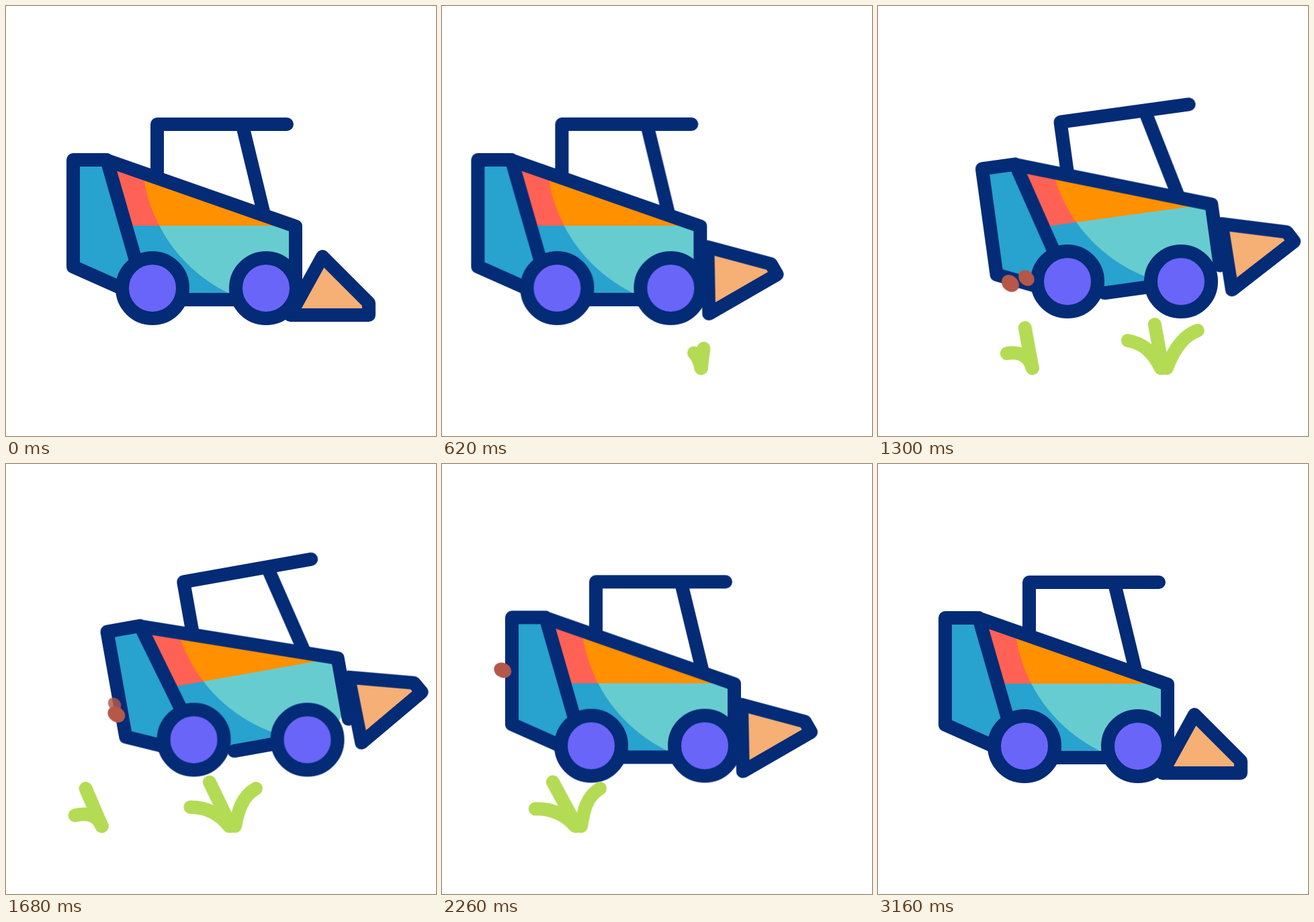
Recreate the animation shown at these times as an HTML page without scripts. Size 640 by 640 pixels, loop 3600 ms.

```html
<!DOCTYPE html>
<html lang="en">
<head>
<meta charset="utf-8">
<title>Loader at work</title>
<style>
  html, body { margin: 0; width: 100%; height: 100%; overflow: hidden; background: #fff; }
  svg { display: block; width: 100vw; height: 100vh; }

  .line { fill: none; stroke: #042b76; stroke-width: 20; stroke-linecap: round; stroke-linejoin: round; }
  .line.wheel { fill: #6a65f9; }
  .line.bucket { fill: #f6af75; }

  .drive, .tilt, .lift { animation: 3600ms cubic-bezier(.36, 0, .64, 1) infinite; }
  .drive { animation-name: drive; }
  .tilt { animation-name: tilt; transform-origin: 265.5px 307px; }
  .lift { animation-name: lift; transform-origin: 430px 420px; }

  @keyframes drive {
    0%, 66.4%, 100% { transform: translate(0, 0); }
    16.111% { transform: translate(-47.5px, 0); }
    36.222%, 43.9% { transform: translate(64px, -10px); }
  }
  @keyframes tilt {
    0%, 20%, 57.222%, 100% { transform: rotate(0deg); }
    44.444%, 45% { transform: rotate(-10.6deg); }
  }
  @keyframes lift {
    0%, 87.778%, 100% { transform: rotate(0deg); }
    15.5%, 74.444% { transform: rotate(-30deg); }
  }

  /* Grass: the tuft slides, each blade grows, bends and shrinks */
  .tuft { animation: 3600ms linear infinite; }
  .tuft path {
    fill: none; stroke: #b3db54; stroke-width: 20; stroke-linecap: round;
    stroke-dasharray: 1 2; stroke-dashoffset: 1; opacity: 0;
    animation: 3600ms ease-in-out infinite;
  }
  .small { animation-name: slide-small; }
  .large { animation-name: slide-large; }
  .small .left { animation-name: grow-small, small-left; }
  .small .mid { animation-name: grow-small, small-mid; }
  .large .left { animation-name: grow-large, large-left; }
  .large .mid { animation-name: grow-large, large-mid; }
  .large .right { animation-name: grow-large, large-right; }

  @keyframes slide-small {
    0%, 13.333% { transform: translate(418px, 539px); }
    55%, 100% { transform: translate(74px, 539px); }
  }
  @keyframes slide-large {
    0%, 25.556% { transform: translate(512.6px, 539px); }
    77.778%, 100% { transform: translate(79.3px, 539px); }
  }
  @keyframes grow-small {
    0%, 13.333% { stroke-dashoffset: 1; opacity: 0; }
    13.34% { stroke-dashoffset: 1; opacity: 1; }
    21.111%, 46.667% { stroke-dashoffset: 0; opacity: 1; }
    55% { stroke-dashoffset: 1; opacity: 1; }
    55.01%, 100% { stroke-dashoffset: 1; opacity: 0; }
  }
  @keyframes grow-large {
    0%, 25.556% { stroke-dashoffset: 1; opacity: 0; }
    25.56% { stroke-dashoffset: 1; opacity: 1; }
    34.444%, 71.111% { stroke-dashoffset: 0; opacity: 1; }
    77.778% { stroke-dashoffset: 1; opacity: 1; }
    77.79%, 100% { stroke-dashoffset: 1; opacity: 0; }
  }
  @keyframes small-left {
    0%, 26.111% { d: path("M0 0C-4 -18 -12 -30 -33 -32"); }
    36.111% { d: path("M0 0C-4 -14 -14 -26 -38 -22"); }
    45%, 100% { d: path("M0 0C-5 -12 -16 -22 -40 -16"); }
  }
  @keyframes small-mid {
    0%, 15% { d: path("M0 0L8 -58"); }
    26.111% { d: path("M0 0L2 -58"); }
    36.111% { d: path("M0 0L-11 -60"); }
    45%, 100% { d: path("M0 0L-24 -56"); }
  }
  @keyframes large-left {
    0%, 36.111%, 74.444%, 100% { d: path("M-4 0C-16 -24 -30 -37 -53 -41"); }
    55.556% { d: path("M-6 0C-22 -14 -44 -22 -70 -19"); }
  }
  @keyframes large-mid {
    0%, 36.111%, 74.444%, 100% { d: path("M-1 0L-13 -65"); }
    55.556% { d: path("M-4 0L-50 -66"); }
  }
  @keyframes large-right {
    0%, 36.111%, 74.444%, 100% { d: path("M5 0C14 -24 28 -48 51 -56"); }
    55.556% { d: path("M3 0C4 -22 4 -42 23 -56"); }
  }

  /* Clods thrown back by the wheel */
  .clod { fill: #b55749; opacity: 0; animation: 3600ms linear infinite; }
  .near { animation-name: near; }
  .far { animation-name: far; }
  @keyframes near {
    0%, 34.7% { transform: translate(231px, 408px) rotate(45deg) scale(0); opacity: 1; }
    36.111% { transform: translate(221px, 405px) rotate(45deg) scale(.92); opacity: 1; }
    46% { transform: translate(165px, 360px) rotate(40deg) scale(.92); opacity: 1; }
    50%, 100% { transform: translate(145px, 344px) rotate(40deg) scale(0); opacity: 0; }
  }
  @keyframes far {
    0%, 34.7% { transform: translate(207px, 421px) rotate(42deg) scale(0); opacity: 1; }
    36.111% { transform: translate(197px, 413px) rotate(42deg) scale(1); opacity: 1; }
    55.556% { transform: translate(137px, 339px) rotate(30deg) scale(.95); opacity: 1; }
    70% { transform: translate(44px, 275px) rotate(20deg) scale(.95); opacity: 1; }
    73%, 100% { transform: translate(36px, 270px) rotate(20deg) scale(0); opacity: 0; }
  }
</style>
</head>
<body>
<svg viewBox="0 0 640 640">
  <defs>
    <clipPath id="hull"><path d="M149 229L431 328V405L400 437H209Z"/></clipPath>
  </defs>

  <g class="drive">
    <g class="tilt">
      <path fill="#28a2ce" d="M100 229H149L209 437L172 420L100 388Z"/>
      <g clip-path="url(#hull)">
        <path fill="#ff9000" d="M140 220H440V327H140Z"/>
        <path fill="#67ccd0" d="M140 327H440V440H140Z"/>
        <path fill="#ff6255" d="M140 220H203.8V245A228.4 228.4 0 0 0 228.2 327H140Z"/>
        <path fill="#28a2ce" d="M140 327H228.2A228.4 228.4 0 0 0 363 440H140Z"/>
      </g>
      <path class="line" d="M172 420L100 388V229H148L431 328V420M255 437H343M150 229L194 382"/>
      <path class="line" d="M225 250V176H418M352 178L383 306"/>
      <path class="line bucket lift" d="M471 373L540 442V460H423Z"/>
    </g>
    <circle class="line wheel" cx="218" cy="420" r="45"/>
    <circle class="line wheel" cx="387" cy="420" r="45"/>
  </g>

  <g class="tuft small">
    <path class="left" pathLength="1" d="M0 0C-4 -18 -12 -30 -33 -32"/>
    <path class="mid" pathLength="1" d="M0 0L2 -58"/>
  </g>
  <g class="tuft large">
    <path class="left" pathLength="1" d="M-4 0C-16 -24 -30 -37 -53 -41"/>
    <path class="mid" pathLength="1" d="M-1 0L-13 -65"/>
    <path class="right" pathLength="1" d="M5 0C14 -24 28 -48 51 -56"/>
  </g>

  <ellipse class="clod near" rx="14" ry="11.5"/>
  <ellipse class="clod far" rx="14" ry="11.5"/>
</svg>
</body>
</html>
```
